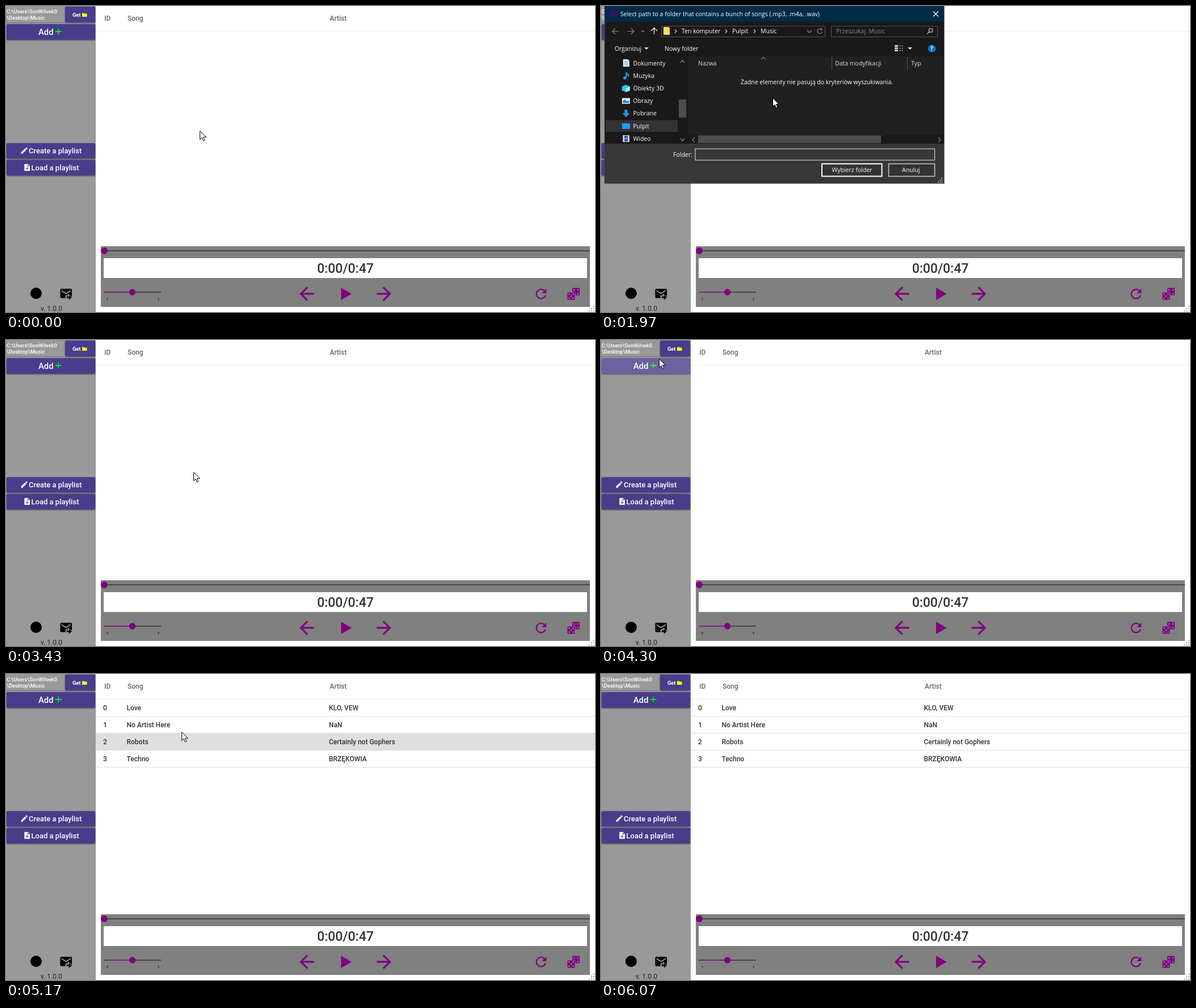
An HTML page that plays this animation: 1037x540 px, repeating every 6360 ms.

```html
<!DOCTYPE html>
<html lang="en">
<head>
<meta charset="utf-8">
<title>Music player</title>
<style>
  html, body { margin: 0; width: 100%; height: 100%; overflow: hidden; background: #fff; }
  svg { display: block; width: 1037px; height: 540px; }
  text { font: 500 12px Roboto, sans-serif; white-space: pre; }
  .button { fill: #483d8b; filter: drop-shadow(0 1px 1px #0008); }
  .label text { font-size: 13px; fill: #fff; }
  .label .small { font-size: 9.3px; }
  .head text { fill: #666; }
  .row text { fill: #333; }
  .purple { fill: purple; }
  #dialog text { font: 10.5px "Open Sans", sans-serif; fill: #fff; }
  .line { fill: none; stroke: #ccc; stroke-width: 1.2; }
  .dim { stroke: #888; }
</style>
</head>
<body>
<svg viewBox="0 0 1037 540">
  <rect width="1037" height="540" fill="#fff"/>
  <g class="head">
    <text x="173" y="26">ID</text><text x="214" y="26">Song</text><text x="570" y="26">Artist</text>
    <path d="M158 44.5H1037" stroke="#ececec"/>
  </g>
  <g id="list"></g>

  <rect width="158" height="540" fill="#999"/>
  <path d="M0 29.5H102" stroke="#777"/>
  <rect class="button" x="104" y="1" width="53" height="28" rx="2"/>
  <rect class="button" x="1" y="32" width="156" height="27.5" rx="2"/>
  <rect class="button" x="1" y="242" width="156" height="27" rx="2"/>
  <rect class="button" x="1" y="271.5" width="156" height="27.5" rx="2"/>
  <g class="label">
    <text class="small" x="1" y="13">C:\Users\SonWilvek0</text>
    <text class="small" x="1" y="24">\Desktop\Music</text>
    <text class="small" x="117" y="18.5" style="font-weight:700">Get</text>
    <text x="57" y="51" style="font-size:14.8px">Add</text>
    <text x="40" y="260">Create a playlist</text>
    <text x="44.5" y="289.5">Load a playlist</text>
  </g>
  <path d="M134 12.5h3.5l1 1h4V19H134Z" fill="#ff0"/>
  <path d="M87 45H97.500M92.200 40V50" stroke="#0e1" stroke-width="1.8"/>
  <g fill="#fff">
    <path transform="translate(24.700 247.500) scale(.63)" d="M20.700 7a1 1 0 0 0 0-1.400L18.400 3.300a1 1 0 0 0-1.400 0L15.100 5.100 18.900 8.900ZM3 17.200V21H6.800L17.800 9.900 14.100 6.200Z"/>
    <path transform="translate(29.900 277.600) scale(.61)" fill-rule="evenodd" d="M14 2H6A2 2 0 0 0 4 4V20A2 2 0 0 0 6 22H18A2 2 0 0 0 20 20V8ZM13 3.500 18.500 9H13ZM11 11h2v3h3v2h-3v3h-2v-3H8v-2h3Z"/>
  </g>
  <rect id="getGlow" x="104" y="1" width="53" height="28" rx="2" fill="#fff"/>
  <rect id="addGlow" x="1" y="32" width="156" height="27.500" rx="2" fill="#fff"/>
  <circle cx="53" cy="507" r="10"/>
  <path transform="translate(93.400 495) scale(1.030)" fill-rule="evenodd" d="M20 4H4A2 2 0 0 0 2 6V18A2 2 0 0 0 4 20H11V15H15V12L22 17V6A2 2 0 0 0 20 4ZM20 8 12 13 4 8V6L12 11 20 6ZM13 17H17V14L22 18.500 17 23V20H13Z"/>
  <text x="61" y="537.500" fill="#222" style="font-weight:400">v. 1.0.0</text>

  <rect x="167" y="424" width="861" height="107" fill="gray"/>
  <path d="M173 432H1028M222 505H273" stroke="#333" stroke-width="1.600"/>
  <path d="M172 505H222M178.500 515v4M268.500 515v4" stroke="purple" stroke-width="1.500"/>
  <rect x="172" y="445" width="851" height="35" fill="#fff"/>
  <text x="597.500" y="471" text-anchor="middle" fill="#333" style="font-size:23px">0:00/0:47</text>
  <g class="purple">
    <circle cx="173" cy="432" r="6"/><circle cx="222.500" cy="505" r="5.700"/>
    <path id="arrow" transform="translate(510 488.500) scale(1.620)" d="M20 11V13H8L13.500 18.500 12.100 19.900 4.200 12 12.100 4.100 13.500 5.500 8 11Z"/>
    <use href="#arrow" transform="matrix(-1 0 0 1 1195 0)"/>
    <path d="M590 497V519L608.500 508Z"/>
    <path transform="translate(928 494) scale(1.170)" d="M17.650 6.350A8 8 0 1 0 19.730 14H17.650A6 6 0 1 1 16.220 7.780L13 11H20V4Z"/>
    <rect x="997" y="497.500" width="13" height="13" rx="1.500"/>
    <rect x="988" y="505" width="14" height="14" rx="2" stroke="gray"/>
  </g>
  <path d="M1000 501h0M1007 501h0M1007 507.500h0M991.500 508.500h0M998.500 508.500h0M995 512h0M991.500 515.500h0M998.500 515.500h0" stroke="#999" stroke-width="2.400" stroke-linecap="round"/>
  <path d="M1034 530h2M1030 534h6M1026 538h10" stroke="#9fb4d0" stroke-width="2" stroke-dasharray="2"/>

  <g id="dialog">
    <rect x="6" width="598.500" height="313.500" fill="#383838"/>
    <rect x="7" width="597" height="28" fill="#002b47"/>
    <rect x="7" y="28" width="597" height="215" fill="#191919"/>
    <rect x="154" y="89" width="450" height="139" fill="#202020"/>
    <rect x="8" y="201.500" width="127" height="20.500" fill="#333"/>
    <path d="M137 165h13v32h-13ZM171 228.500H493V242H171Z" fill="#4d4d4d"/>
    <circle cx="22" cy="14" r="6.500" fill="#35126e"/>
    <path class="line" style="stroke:#fff" d="M585 9.500l9 9m0-9l-9 9M99 44l-5.500-5.500L88 44m5.500-5.500V50"/>
    <path class="line dim" d="M31 44.500H20m5-5l-5 5 5 5M47 44.500H58m-5-5l5 5-5 5M71 43l3 3 3-3M363 43l4 4 4-4M388 41a4.200 4.200 0 1 0 1.500 4M389 39v3h-3M140 100l3.500-4 3.500 4M140 234l3.500 4 3.500-4M165 232l-4 4 4 4M594 232l4 4-4 4M282 94l4-3.500 4 3.500"/>
    <path class="line" d="M130 41.500l3 3-3 3M219 41.500l3 3-3 3M269 41.500l3 3-3 3M578 45.500l-4 4"/>
    <circle class="line" cx="580.500" cy="43" r="3.300"/>
    <path class="line" style="stroke:#555;stroke-width:1" d="M106.500 35.500H394.500V54.500H106.500ZM405.500 35.500H592.500V54.500H405.500ZM406.500 90V113M539.500 90V113"/>
    <path d="M110 37h9l2 2v12h-11Z" fill="#ffd767"/>
    <path d="M76 73h8l-4 4ZM540 73h8l-4 4Z" fill="#ddd"/>
    <path d="M517 70.500h6M517 74.500h6M517 78.500h6" stroke="#ccc" stroke-width="3"/>
    <path d="M525 70.500h7M525 74.500h7M525 78.500h7" stroke="#aaa" stroke-dasharray="3 1"/>
    <circle cx="582.500" cy="75" r="6.800" fill="#0078d7"/>
    <rect x="166" y="252" width="421.500" height="20" fill="none" stroke="#eee"/>
    <rect x="389" y="278.500" width="105.500" height="22" fill="#333" stroke="#fff" stroke-width="2"/>
    <rect x="506.500" y="278.500" width="81" height="22" fill="#333" stroke="#ccc" stroke-width="1.500"/>
    <path d="M599 304h2M596 307.500h5M593 311h8" stroke="#aaa" stroke-width="2" stroke-dasharray="2 1.500"/>
    <g id="words"></g>
    <text x="579.800" y="79" style="font-weight:700">?</text>
    <path d="M39 94h8l3 3v10H39Z" fill="#e8f4ff"/><path d="M41 98h6M41 101h7M41 104h7" stroke="#2a8fd8"/>
    <path d="M44.500 117v9M44.500 117q0 3 4 4.500v3" fill="none" stroke="#1ea0ff" stroke-width="2"/><circle cx="42" cy="127" r="2.700" fill="#1ea0ff"/>
    <path d="M37 142l7-3 7 3v7l-7 3-7-3Z" fill="#35c3ea"/><path d="M44 145l7-3v7l-7 3Z" fill="#a5ecfa"/>
    <path d="M37 162.500H51V172.500H37Z" fill="#e8f4ff"/><path d="M38.500 171v-4l4-2 3 3 4-1v4Z" fill="#2f86c8"/>
    <path d="M41.500 183h5v6h4l-6.500 7-6.500-7h4Z" fill="#2f8fe8"/>
    <path d="M37 207H51V217H37Z" fill="#1a9cf5"/>
    <path d="M38.500 228H50V240H38.500Z" fill="#ddd"/><path d="M41 229h6.500v4.500H41ZM41 234.500h6.500v4.500H41Z" fill="#355a9c"/>
  </g>

  <path id="pointer" d="M.5 .5V15.500L4 12.200 6.400 17.800 8.800 16.800 6.400 11.300H11.200Z" fill="#fff" stroke="#000"/>
  <circle id="busy" r="6.800" fill="none" stroke="#2b9cea" stroke-width="4.600"/>
</svg>
<script>
const LOOP = 6360;
const $ = id => document.getElementById(id);
const text = (x, y, s, fill = "") => `<text x="${x}" y="${y}"${fill && ` style="fill:${fill}"`}>${s}</text>`;

const rowTops = [45, 75, 105, 135, 165];
const songs = [
  ["Love", "KLO, VEW"],
  ["No Artist Here", "NaN"],
  ["Robots", "Certainly not Gophers"],
  ["Techno", "BRZĘKOWIA"],
];
$("list").innerHTML = songs.map(([song, artist], i) => {
  const top = rowTops[i], bottom = rowTops[i + 1], base = top + 19.3;
  return `<g class="row"><rect x="158" y="${top}" width="879" height="${bottom - top}" fill="#fff"/>
    <path d="M158 ${bottom - .5}H1037" stroke="#ddd"/>
    ${text(171, base, i)}${text(212.5, base, song)}${text(568.5, base, artist)}</g>`;
}).join("");
const rowFills = document.querySelectorAll(".row rect");

$("words").innerHTML = [
  [34, 18, "Select path to a folder that contains a bunch of songs (.mp3, .m4a, .wav)"],
  [142, 48, "Ten komputer"], [231, 48, "Pulpit"], [281, 48, "Music"],
  [414, 48, "Przeszukaj: Music", "#888"], [24, 78.5, "Organizuj"], [112, 78.5, "Nowy folder"],
  [171, 105, "Nazwa", "#ddd"], [412, 105, "Data modyfikacji", "#ddd"], [546, 105, "Typ", "#ddd"],
  [246, 137.5, "Żadne elementy nie pasują do kryteriów wyszukiwania."],
  [127, 266, "Folder:"], [406.5, 293, "Wybierz folder"], [530, 293, "Anuluj"],
  ...["Dokumenty", "Muzyka", "Obiekty 3D", "Obrazy", "Pobrane", "Pulpit", "Wideo"]
    .map((name, i) => [56.5, 104.5 + 22.2 * i, name]),
].map(word => text(...word)).join("");

// Pointer path: time, x, y
const path = [
  [0, 341, 220], [30, 341, 220], [330, 270, 130], [630, 180, 36], [850, 132, 16], [1000, 138, 18],
  [1100, 158, 31], [1300, 225, 95], [1550, 390, 245], [1750, 345, 205], [1970, 302, 162],
  [2100, 282, 148], [2300, 178, 190], [2600, 378, 248], [2850, 430, 288], [3050, 395, 262],
  [3270, 334, 226], [3430, 330, 232.500], [3530, 330, 231], [3670, 316, 223], [4000, 142, 14],
  [4200, 118, 35], [4400, 118, 42], [4630, 366, 167.500], [4760, 378, 235], [4970, 345, 215],
  [5170, 309, 102], [5330, 295, 58], [5600, 255, 150], [6050, 60, 545], [6360, 60, 560],
];
const slope = (i, k) => {
  const a = path[Math.max(i - 1, 0)], b = path[Math.min(i + 1, path.length - 1)];
  return (b[k] - a[k]) / (b[0] - a[0]);
};
function pointerAt(t) {
  const i = Math.max(0, path.findIndex(p => p[0] > t) - 1);
  const a = path[i], b = path[i + 1], span = b[0] - a[0], u = (t - a[0]) / span;
  return [1, 2].map(k =>
    (1 + 2 * u) * (1 - u) ** 2 * a[k] + u * u * (3 - 2 * u) * b[k] +
    span * u * (1 - u) * ((1 - u) * slope(i, k) - u * slope(i + 1, k)));
}

const ramp = (t, from, to) => Math.min(1, Math.max(0, (t - from) / (to - from)));
const pulse = (t, a, b, c, d) => ramp(t, a, b) - ramp(t, c, d);
const show = (id, on) => $(id).setAttribute("visibility", on ? "visible" : "hidden");

function draw(now) {
  const t = now % LOOP;
  const [x, y] = pointerAt(t);
  const place = `translate(${Math.round(x)} ${Math.round(y)})`;
  const busy = t >= 1030 && t < 1230;
  $("pointer").setAttribute("transform", place);
  $("busy").setAttribute("transform", place);
  show("pointer", !busy);
  show("busy", busy);
  show("dialog", t >= 1230 && t < 3200);
  show("list", t >= 4400);

  // Row highlighting trails the pointer slightly
  const [hoverX, hoverY] = pointerAt(Math.max(0, t - 40));
  rowFills.forEach((rect, i) => {
    const over = hoverX >= 158 && hoverY >= rowTops[i] && hoverY < rowTops[i + 1];
    rect.setAttribute("fill", over ? "#dfdfdf" : "#fff");
  });
  $("getGlow").setAttribute("opacity", .18 * (pulse(t, 680, 800, 950, 1080) + pulse(t, 3200, 3201, 3230, 3430) + pulse(t, 3920, 4000, 4060, 4200)));
  $("addGlow").setAttribute("opacity", .19 * pulse(t, 4120, 4250, 4630, 4850));
  requestAnimationFrame(draw);
}
requestAnimationFrame(draw);
</script>
</body>
</html>
```
